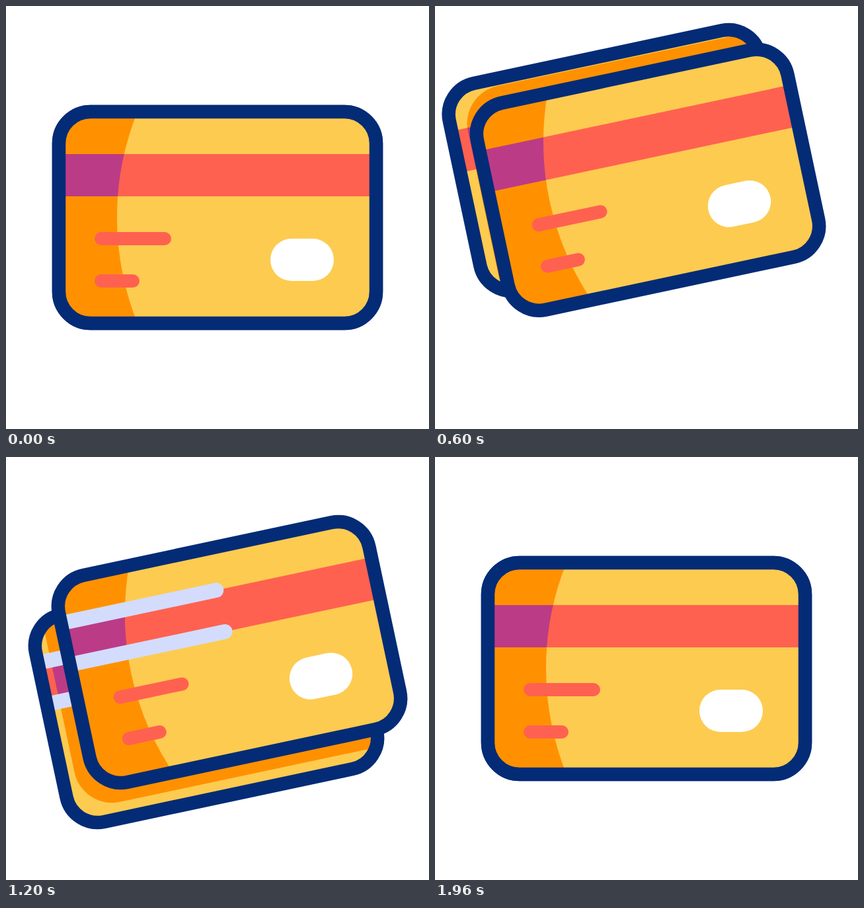
Recreate the animation shown at these times as an HTML page. Size 640 by 640 pixels, loop 2000 ms.

```html
<!DOCTYPE html>
<html lang="en">
<head>
<meta charset="utf-8">
<title>Bank cards</title>
<style>
  html, body { margin: 0; width: 100%; height: 100%; overflow: hidden; background: #fff; }
  svg { display: block; width: 100%; height: 100%; }
  .yellow { fill: #fdcb50; }
  .orange { fill: #ff9100; }
  .red { fill: #ff6150; }
  .purple { fill: #bc3b86; }
  .border { fill: none; stroke: #042b76; stroke-width: 20.5; }
  .lines { stroke: #ff6150; stroke-width: 20; stroke-linecap: round; }
  .shine { fill: none; stroke: #d3dcfc; stroke-width: 22.5; stroke-linecap: round; }
</style>
</head>
<body>
<svg viewBox="0 0 640 640">
  <defs>
    <rect id="shape" x="-240" y="-160" width="480" height="320" rx="48"/>
    <rect id="stripe" x="-250" y="-96" width="500" height="64"/>
    <clipPath id="inside"><use href="#shape"/></clipPath>
    <clipPath id="curve"><path d="M-260-170H-117A430 430 0 0 0-117 170H-260Z"/></clipPath>
    <clipPath id="shadow"><rect id="cast" width="500" height="340" rx="58"/></clipPath>
    <g id="base">
      <use href="#shape" class="yellow"/>
      <use href="#stripe" class="red"/>
    </g>
    <g id="shade">
      <use href="#shape" class="orange"/>
      <use href="#stripe" class="purple"/>
    </g>
  </defs>
  <g id="back">
    <g clip-path="url(#inside)">
      <use href="#base"/>
      <g clip-path="url(#shadow)"><use href="#shade"/></g>
      <path class="shine"/>
    </g>
    <use href="#shape" class="border"/>
  </g>
  <g id="front">
    <g clip-path="url(#inside)">
      <use href="#base"/>
      <g clip-path="url(#curve)"><use href="#shade"/></g>
      <path class="lines" d="M-176 32H-80M-176 96H-128"/>
      <rect x="80" y="32" width="96" height="64" rx="32" fill="#fff"/>
      <path class="shine"/>
    </g>
    <use href="#shape" class="border"/>
  </g>
</svg>
<script>
const LOOP = 2000, STEP = 40;
const front = document.getElementById('front');
const back = document.getElementById('back');
const cast = document.getElementById('cast');
const shines = document.querySelectorAll('.shine');

// Eased value at time t through keys of [time, value]
function track(t, ...keys) {
  let value = keys[0][1];
  for (let i = 1; i < keys.length; i++) {
    const [t0, v0] = keys[i - 1], [t1, v1] = keys[i];
    if (t <= t0) break;
    const u = Math.min(1, (t - t0) / (t1 - t0));
    value = v0 + (v1 - v0) * u * u * (3 - 2 * u);
  }
  return value;
}

function place(card, x, y, angle) {
  card.setAttribute('transform', `translate(${320 + x} ${320 + y}) rotate(${angle})`);
}

function draw(t) {
  const home = track(t, [1558, 1], [1886, 0]);
  const angle = home * track(t, [88, 0], [354, -12]);
  const jump = track(t, [88, 0], [350, 82], [695, -85], [972, 0]);

  const fx = home * track(t, [467, 0], [1100, 18]);
  const fy = home * (jump + track(t, [467, 0], [1100, -24.5]));
  const bx = home * track(t, [88, 0], [390, -45], [433, -45], [1067, -17]);
  const by = home * (jump + track(t, [88, 0], [357, -40], [467, -40], [1150, 35.5]));
  place(front, fx, fy, angle);
  place(back, bx, by, angle);

  // The shadow follows the front card, measured along the back card's axes
  const r = angle * Math.PI / 180, c = Math.cos(r), s = Math.sin(r);
  const dx = fx - bx, dy = fy - by;
  const sx = home * track(t, [88, 0], [220, -12], [467, -1], [600, -1], [1150, -17]);
  const sy = home * track(t, [88, 0], [350, -20], [467, -20], [1150, 17]);
  cast.setAttribute('x', dx * c + dy * s + sx - 250);
  cast.setAttribute('y', dy * c - dx * s + sy - 170);

  const head = track(t, [985, -240], [1415, 240]);
  const tail = track(t, [1255, -240], [1685, 240]);
  const d = head > tail ? `M${tail}-96H${head}M${tail}-32H${head}` : '';
  shines.forEach(p => p.setAttribute('d', d));
}

const start = performance.now();
function tick() {
  const t = (performance.now() - start) % LOOP;
  draw(Math.floor(t / STEP) * STEP);
  requestAnimationFrame(tick);
}
tick();
</script>
</body>
</html>
```
